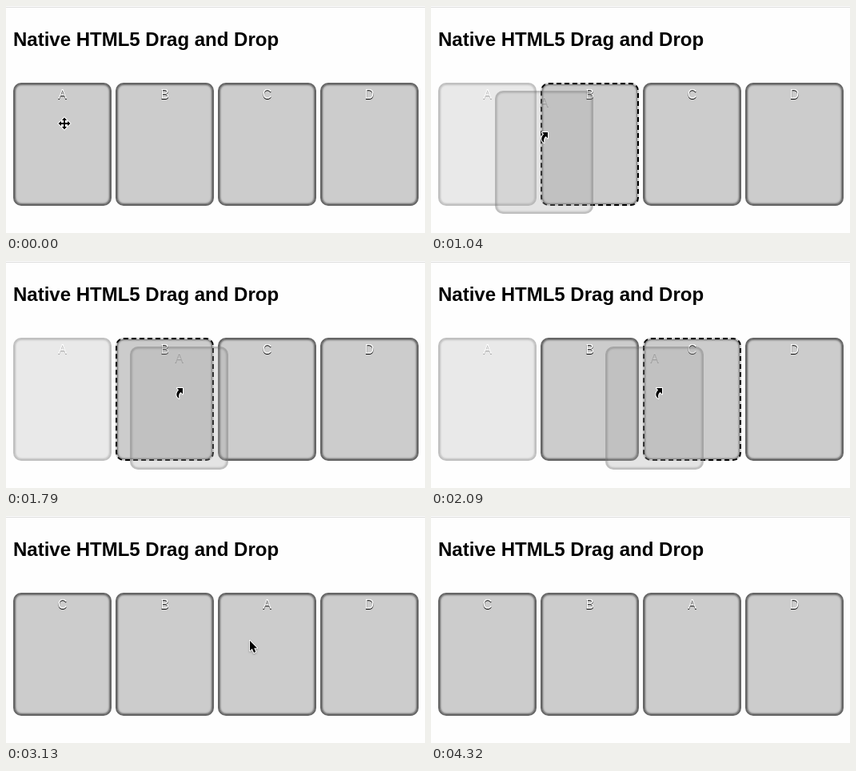
Animation of 524 by 284 pixels, one loop 4950 ms. Source, as an HTML page:

```html
<!DOCTYPE html>
<html lang="en">
<head>
<meta charset="utf-8">
<title>Drag and Drop</title>
<style>
  html, body { margin: 0; width: 100%; height: 100%; overflow: hidden; background: #fefefe; }
  body { position: relative; font: 16px/18px "Liberation Sans", Arial, sans-serif; }
  body::before { content: ""; position: absolute; top: 1px; width: 100%; height: 1px; background: #dcdcdc; }
  h1 { position: absolute; left: 9px; top: 28px; margin: 0; font-size: 24px; line-height: 28px; white-space: nowrap; }

  .box, .ghost, svg { position: absolute; left: 0; top: 0; }
  .box, .ghost {
    box-sizing: border-box; width: 123px; height: 154px; padding-top: 4px;
    border: 2px solid #666; border-radius: 10px; text-align: center;
  }
  .box {
    left: calc(9px + 128px * var(--i)); top: 96px; background: #ccc;
    box-shadow: inset 0 0 3px #000; color: #fff; text-shadow: 0 1px #000;
  }
  .box span { position: absolute; left: 0; width: 100%; }
  .ghost {
    background: rgba(170, 170, 170, .3); border-color: rgba(85, 85, 85, .25);
    box-shadow: inset 0 0 3px rgba(0, 0, 0, .3);
    color: rgba(255, 255, 255, .22); text-shadow: 0 1px rgba(0, 0, 0, .22);
  }
  svg { overflow: visible; stroke: #fff; stroke-width: 2; stroke-linejoin: round; paint-order: stroke; }

  .box, .box span, .ghost, svg { animation: 4950ms step-end infinite; }
  .held { animation-name: held; }
  .over-b { animation-name: over-b; }
  .over-c { animation-name: over-c; }
  .box .before { animation-name: before; }
  .box .after { animation-name: after; }
  .ghost { animation-name: ghost; }
  .move { animation-name: move; }
  .alias { animation-name: alias; }
  .arrow { animation-name: arrow; filter: drop-shadow(0 1px 1px rgba(0, 0, 0, .3)); }

  @keyframes held { 0%, 63.23%, 100% { opacity: 1; } 14.94% { opacity: .4; } }
  @keyframes over-b { 0%, 42.22%, 100% { border: 2px solid #666; } 21.01% { border: 2px dashed #000; } }
  @keyframes over-c { 0%, 63.23%, 100% { border: 2px solid #666; } 42.22% { border: 2px dashed #000; } }
  @keyframes before { 0% { visibility: visible; } 63.23%, 100% { visibility: hidden; } }
  @keyframes after { 0% { visibility: hidden; } 63.23%, 100% { visibility: visible; } }
  @keyframes move {
    0% { visibility: visible; transform: translate(73px, 147px); }
    14.94%, 100% { visibility: hidden; transform: translate(73px, 147px); }
  }
  @keyframes ghost {
    0% { visibility: hidden; transform: none; }
    17.97% { visibility: visible; transform: translate(25px, 98px); }
    21.01% { visibility: visible; transform: translate(80px, 106px); }
    24.04% { visibility: visible; transform: translate(102px, 109px); }
    27.07% { visibility: visible; transform: translate(150px, 106px); }
    36.16% { visibility: visible; transform: translate(155px, 107px); }
    39.19% { visibility: visible; transform: translate(202px, 104px); }
    42.22% { visibility: visible; transform: translate(218px, 107px); }
    45.05% { visibility: visible; transform: translate(232px, 106px); }
    48.08% { visibility: visible; transform: translate(241px, 105px); }
    63.23%, 100% { visibility: hidden; transform: none; }
  }
  @keyframes alias {
    0% { visibility: hidden; transform: none; }
    14.94% { visibility: visible; transform: translate(72px, 146px); }
    17.97% { visibility: visible; transform: translate(81px, 149px); }
    21.01% { visibility: visible; transform: translate(136px, 157px); }
    24.04% { visibility: visible; transform: translate(158px, 160px); }
    27.07% { visibility: visible; transform: translate(207px, 157px); }
    36.16% { visibility: visible; transform: translate(211px, 158px); }
    39.19% { visibility: visible; transform: translate(260px, 155px); }
    42.22% { visibility: visible; transform: translate(279px, 158px); }
    45.05% { visibility: visible; transform: translate(289px, 157px); }
    48.08% { visibility: visible; transform: translate(297px, 156px); }
    63.23%, 100% { visibility: hidden; transform: none; }
  }
  @keyframes arrow {
    0% { visibility: hidden; transform: none; }
    63.23% { visibility: visible; transform: translate(304px, 155px); }
    78.38% { visibility: visible; transform: translate(361px, 202px); }
    81.41% { visibility: visible; transform: translate(444px, 261px); }
    84.24% { visibility: visible; transform: translate(482px, 268px); }
    87.27%, 100% { visibility: hidden; transform: none; }
  }
</style>
</head>
<body>
  <h1>Native HTML5 Drag and Drop</h1>

  <div class="box held" style="--i:0"><span class="before">A</span><span class="after">C</span></div>
  <div class="box over-b" style="--i:1">B</div>
  <div class="box over-c" style="--i:2"><span class="before">C</span><span class="after">A</span></div>
  <div class="box" style="--i:3">D</div>
  <div class="ghost">A</div>

  <svg class="move" width="1" height="1">
    <path d="M-1-1V-4H-3L0-7.5L3-4H1V-1H4V-3L7.5 0L4 3V1H1V4H3L0 7.5L-3 4H-1V1H-4V3L-7.5 0L-4-3V-1Z"/>
  </svg>
  <svg class="alias" width="1" height="1">
    <path d="M3 1H10V8.5L7.6 6.1C5.2 8 4.6 10.3 5.4 14C1.4 11.5 1.4 7 5.1 3.6Z"/>
  </svg>
  <svg class="arrow" width="1" height="1">
    <path d="M1 1V13.6L3.9 10.9L6 16L8.3 15L6.2 10.2H10Z"/>
  </svg>
</body>
</html>
```
